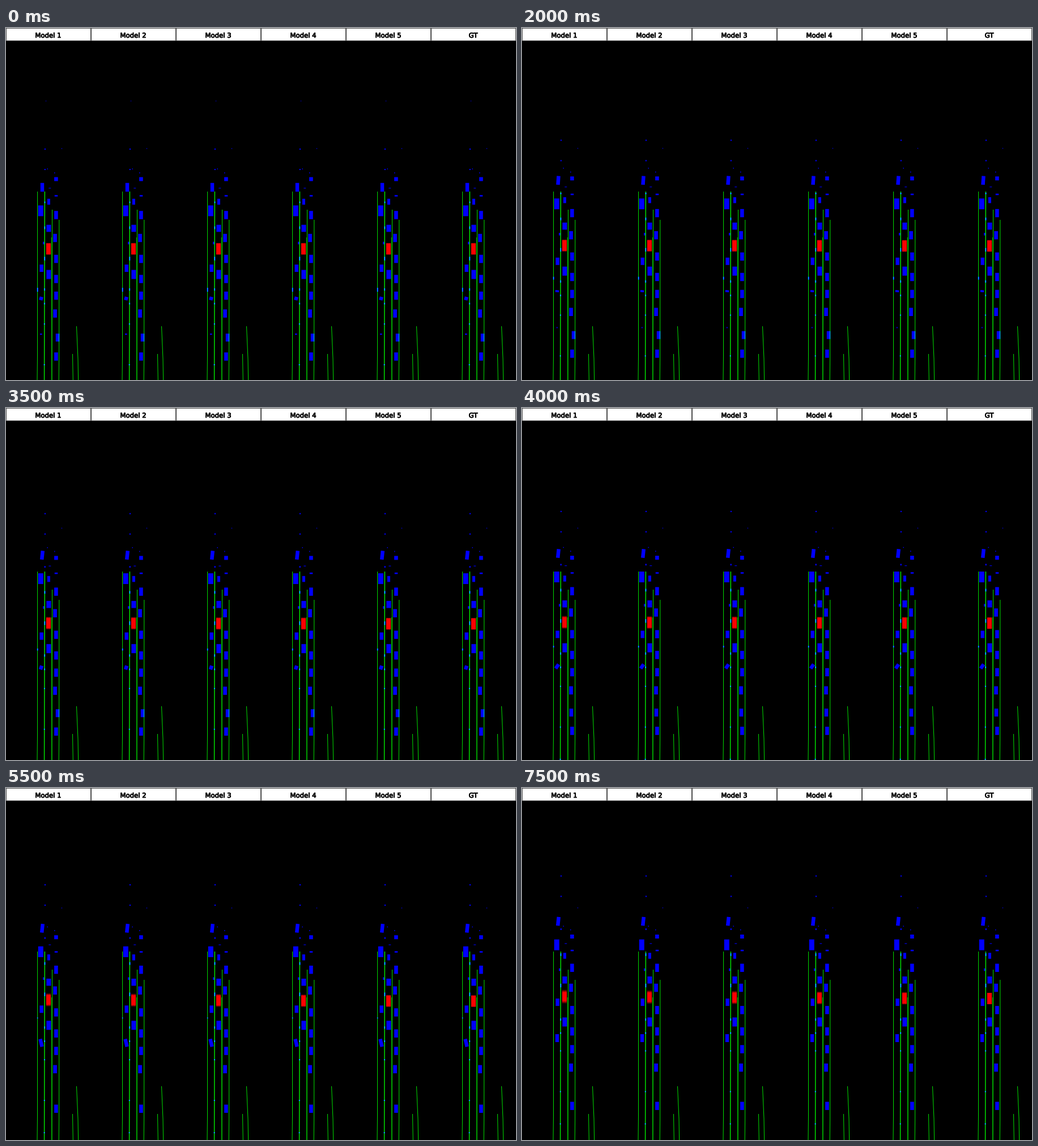
A matplotlib script that plays this animation: 900x622 px, repeating every 8000 ms.

```python
import numpy as np
import matplotlib.pyplot as plt
from matplotlib import patheffects
from matplotlib.animation import FuncAnimation

W, H, PANEL, HEAD, STEPS = 900, 622, 150, 23, 16
TITLES = [f"Model {i}" for i in range(1, 6)] + ["GT"]

yy, xx = np.mgrid[HEAD:H, 0:PANEL] + 0.5


def box(x, y, w, h, tilt=0.0, soft=0.5):
    """Antialiased coverage of a rotated rectangle."""
    a = np.radians(tilt)
    dx, dy = xx - x, yy - y
    u = np.abs(dx * np.cos(a) + dy * np.sin(a))
    v = np.abs(dy * np.cos(a) - dx * np.sin(a))
    across = np.clip(w / 2 + 0.5 - u, 0, min(1, w))
    along = np.clip((h / 2 + soft - v) / (2 * soft), 0, min(1, h))
    return across * along


def boxes(x, y, w, h, tilt=0.0):
    return [box(*row) for row in np.broadcast(x, y, w, h, tilt)]


def line(points, width=1.0):
    px, py = np.array(points).T
    off = np.abs(xx - np.interp(yy, py, px))
    return np.clip(width / 2 + 0.5 - off, 0, 1) * (yy > py[0])


LANES = 0.88 * np.max([
    line([(55.6, 289), (55.5, 580), (55, 622)]),
    line([(68.4, 289), (67.6, 622)], 1.5),
    line([(81.5, 321), (81.1, 622)]),
    line([(80.8, 370), (80.7, 622)]),
    line([(93.8, 339), (93.6, 586), (93.2, 622)]),
    line([(124.5, 527), (127, 585), (127.6, 622)]),
    line([(117.5, 576), (118.3, 622)]),
], axis=0)


def left_lane(t):
    y = np.array([281.5, 323, 424.5]) - 3.06 * t
    cars = boxes([64, 61.3, 62.7], y, [6.5, 9, 6.5], [15.5, 19, 13],
                 [min(6, t), 0, 0])
    # a newcomer that is first seen at odd angles
    y = np.interp(t, [0, 4, 15], [478, 465, 442])
    length = np.interp(t, [0, 5, 8, 11], [6, 3, 9, 14])
    tilt = np.interp(t, [0, 6, 8, 11, 13], [15, 0, 35, -13, 0])
    cars.append(box(62, y, 6.3, length, tilt))
    # fading detections
    cars.append(box(61.8, 541 - 2.9 * t, max(0, 3.6 - 0.5 * t), 2.2))
    cars.append(box(55.8, 462.5 - 5.1 * t, 2.4, max(0, 7 - 0.5 * t)))
    return cars


def middle_lane(t):
    start = np.array([307, 354, 435.5])
    speed = 0.7 + 0.006 * (start - 307)
    width = np.interp(start, [307, 350], [5, 8])
    length = np.interp(start, [307, 435], [10.5, 16])
    return boxes(75.4, start - speed * t, width, length)


def right_lane(t):
    start = np.array([267, 330.5, 371, 408, 443.5, 473, 504.5, 580.5])
    speed = np.interp(start, [267, 371, 500, 560], [0.3, 1.2, 0.65, 1.25])
    x = 88.4 - 1.8 * (np.arange(len(start)) % 4 == 2)
    length = np.interp(start, [267, 310], [7, 14.5])
    cars = boxes(x, start - speed * t, 6.6, length)
    if t < 10:
        cars.append(box(91 if t < 8 else 87, 547 - 1.1 * t, 6.5, 14))
    return cars


def riders(t):
    """Small fast objects that follow the line between the lanes."""
    start = np.array([214, 250, 308, 353, 407.5, 462, 487, 523, 595, 652])
    speed = 3.9 - 0.55 * np.exp(-((start - 473) / 18) ** 2)
    y = start - speed * t
    x = np.interp(y, [200, 600], [69, 67.6])
    length = 2 + 4.5 * np.exp(-((start - 400) / 70) ** 2)
    return boxes(x, y, 2.3, length) + [box(66.3, 380 - 3.93 * t, 2.5, 4.5)]


def far_field(t):
    x = np.array([98.5, 73.2, 85.8, 77.3, 88.5])
    start = np.array([213, 249, 256, 283, 296.5])
    specks = boxes(x, start - 0.0065 * (start - 200) * t,
                   [1, 1.5, 1.3, 4, 5.5], [1.6, 1.5, 2, 1.1, 2.6])
    if t < 4:
        specks.append(box(70.5, 129 - 3.6 * t, 3, 0.5))
    return specks


def scene(t):
    p = t / (STEPS - 1)
    blue = np.max(left_lane(t) + middle_lane(t) + right_lane(t)
                  + riders(t) + far_field(t), axis=0)
    ego_y = 390.3 - 18.3 * p * (1.08 - 0.08 * p)
    img = np.zeros((H, W, 3))
    for i in range(len(TITLES)):
        # later models drift and blur less; the last panel is exact
        drift = 3.3 * (1 - i / 5) ** 1.3
        red = box(75, ego_y - drift * p ** 1.2, 8, 20,
                  soft=0.5 + 1.2 * np.sqrt(drift) * p)
        rest = 1 - red
        cols = slice(i * PANEL, (i + 1) * PANEL)
        img[HEAD:, cols] = np.dstack([red, LANES * rest, blue * rest])
        img[:HEAD, cols] = 0.3
        img[1:HEAD - 1, cols][:, 1:-1] = 1
    return img


fig = plt.figure(figsize=(W / 100, H / 100), dpi=100, facecolor="black")
ax = fig.add_axes([0, 0, 1, 1])
ax.axis("off")
picture = ax.imshow(scene(0), extent=(0, W, H, 0), interpolation="nearest",
                    aspect="auto")
bold = [patheffects.withStroke(linewidth=0.65, foreground="black")]
for i, name in enumerate(TITLES):
    ax.text((i + 0.5) * PANEL - 0.5, 17, name, ha="center", va="baseline",
            family="DejaVu Sans", fontsize=8.4, color="black",
            path_effects=bold)
ax.set_xlim(0, W)
ax.set_ylim(H, 0)


def update(t):
    picture.set_data(scene(t))
    return [picture]


anim = FuncAnimation(fig, update, frames=STEPS, interval=500, repeat=True,
                     repeat_delay=0, blit=False)
plt.show()
```
